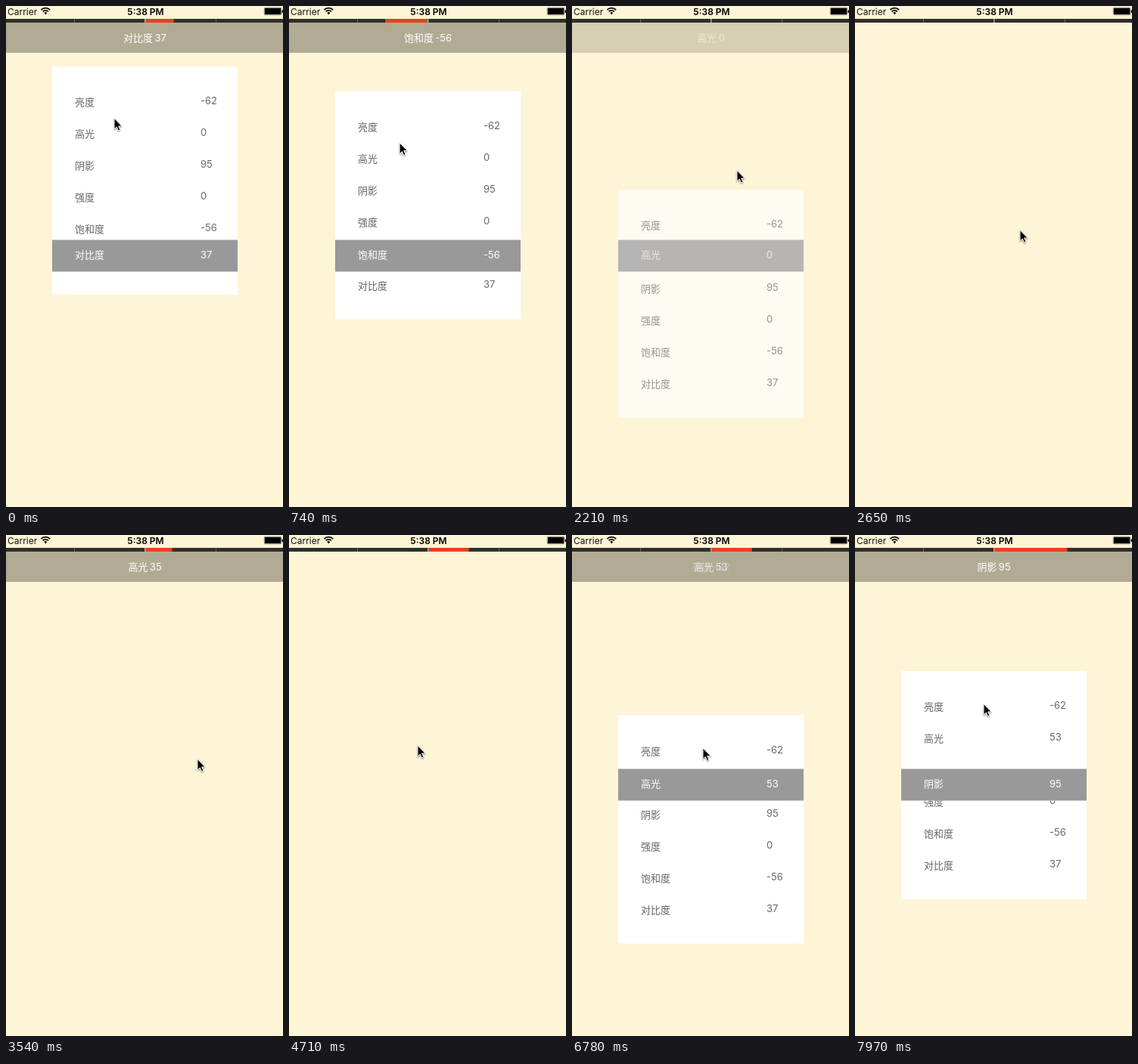
An HTML page with a canvas that plays this animation: 366x663 px, repeating every 8000 ms.

```html
<!DOCTYPE html>
<html lang="zh-CN">
<head>
<meta charset="utf-8">
<style>
  html, body { margin: 0; width: 100%; height: 100%; overflow: hidden; background: #fef4d6; }
  canvas { display: block; }
</style>
</head>
<body>
<canvas id="stage" width="366" height="663"></canvas>
<script>
const g = document.getElementById('stage').getContext('2d');
const FONT = 'Inter, "Noto Sans CJK SC", "Noto Sans CJK", sans-serif';
const LOOP = 8000, STEP = 147.4;
const LEFT = 61, WIDTH = 245, ROW = 42, BAND_Y = 309.5;
const LABELS = ['亮度', '高光', '阴影', '强度', '饱和度', '对比度'];

// Progress from 0 to 1 between steps a and b
const ramp = (k, a, b) => Math.max(0, Math.min(1, (k - a) / (b - a)));
const easeIn = (x, p) => x ** p;
const easeOut = (x, p) => 1 - (1 - x) ** p;
const smooth = x => x * x * (3 - 2 * x);

// Four vertical drags move the panel, one sideways drag sets the highlight
const panelTop = k => Math.round(2 * (80
  + 90 * easeIn(ramp(k, 0, 8), 2.17)
  + 73 * ramp(k, 9, 13)
  + 43 * easeOut(ramp(k, 33, 41), 2.37)
  - 86 * smooth(ramp(k, 43.36, 48.3))
  - 20 * ramp(k, 53, 54))) / 2;

const highlight = k => Math.round(53 * easeOut(ramp(k, 19, 29), 1.56));

const titleAlpha = k =>
  1 - ramp(k, 14, 16) + ramp(k, 19, 21) - ramp(k, 29, 31) + ramp(k, 33, 35);

const panelAlpha = k => 1 - ramp(k, 14, 17.3) + ramp(k, 33, 35);

// The pointer holds the panel and takes a new grip between drags
const pointerX = k => 143 + 5 * ramp(k, 0, 8) + 70 * ramp(k, 8, 13)
  + highlight(k) - 101 * ramp(k, 29, 32)
  + 3 * (ramp(k, 41, 44) - ramp(k, 46, 50));

const pointerY = k => panelTop(k) + 68.5 - 94 * ramp(k, 8, 9)
  + 79 * ramp(k, 15, 18) - 18 * ramp(k, 29, 32) + 8 * ramp(k, 43, 46);

const selectedAt = k =>
  Math.max(0, Math.min(5, Math.round((283.5 - panelTop(k)) / ROW)));

function rect(color, x, y, w, h) {
  g.fillStyle = color;
  g.fillRect(x, y, w, h);
}

function text(str, x, y, color, font = '13px', align = 'left') {
  g.font = font + ' ' + FONT;
  g.textAlign = align;
  g.fillStyle = color;
  g.fillText(str, x, y);
}

function statusBar() {
  text('Carrier', 2, 11.5, '#111', '12px');
  text('5:38 PM', 184.5, 11.5, '#000', '600 12px', 'center');
  g.strokeStyle = '#000';
  g.lineWidth = 1.7;
  const wave = r => {
    g.beginPath();
    g.arc(52.3, 11, r, -Math.PI * .75, -Math.PI * .25);
  };
  wave(8.3);
  g.stroke();
  wave(5.2);
  g.stroke();
  wave(2.8);
  g.lineTo(52.3, 11.5);
  g.fillStyle = '#000';
  g.fill();
  g.lineWidth = .5;
  g.beginPath();
  g.roundRect(341.25, 2.25, 22.5, 9.5, 1.5);
  g.stroke();
  rect('#000', 342, 3, 21, 8);
  rect('#000', 364.5, 5.5, 1.5, 3.5);
}

function slider(value) {
  rect('#2f302b', 0, 17, 366, 5);
  rect('#66665e', 90, 17, 1, 5);
  rect('#66665e', 277, 17, 1, 5);
  rect('#e8421f', 184, 17, value * 1.015, 5);
  rect('#a5a59c', 183, 17, 1.5, 5);
}

function title(k, sel, values) {
  const alpha = titleAlpha(k), old = selectedAt(Math.max(0, k - 1));
  const line = i => text(LABELS[i] + ' ' + values[i], 183.5, 47, '#fff', '13px', 'center');
  g.save();
  g.wordSpacing = '-1.2px';
  g.globalAlpha = alpha;
  rect('#b1ab94', 0, 22, 366, 40);
  if (old === sel) line(sel);
  else {
    g.globalAlpha = alpha * .7;
    line(sel);
    g.globalAlpha = alpha * .3;
    line(old);
  }
  g.restore();
}

function panel(k, sel, values) {
  const top = panelTop(k);
  g.save();
  g.globalAlpha = panelAlpha(k);
  rect('#fff', LEFT, top, WIDTH, 302);
  rect('#999', LEFT, BAND_Y, WIDTH, ROW);
  text(LABELS[sel], 91, 334, '#fff');
  text(values[sel], 257, 334, '#fff');
  // Other rows pass behind the band
  g.beginPath();
  g.rect(LEFT, 0, WIDTH, BAND_Y);
  g.rect(LEFT, BAND_Y + ROW, WIDTH, 400);
  g.clip();
  LABELS.forEach((label, i) => {
    if (i === sel) return;
    const y = top + ROW * i;
    text(label, 91, y + 52, '#666');
    text(values[i], 257, y + 50, '#666');
  });
  g.restore();
}

const ARROW = new Path2D('M0 0V14.6L3.3 11.5L5.5 16.5L7.9 15.4L5.7 10.5H10.2Z');
function pointer(x, y) {
  g.save();
  g.translate(x, y);
  g.shadowColor = 'rgba(0,0,0,.4)';
  g.shadowBlur = 2;
  g.shadowOffsetY = 1;
  g.fillStyle = '#000';
  g.strokeStyle = '#fff';
  g.lineWidth = 1;
  g.fill(ARROW);
  g.stroke(ARROW);
  g.restore();
}

function draw(ms) {
  const k = Math.min(54, Math.floor((ms % LOOP + 15) / STEP));
  const sel = selectedAt(k);
  const values = [-62, highlight(k), 95, 0, -56, 37];
  rect('#fef4d6', 0, 0, 366, 663);
  statusBar();
  slider(values[sel]);
  title(k, sel, values);
  panel(k, sel, values);
  pointer(pointerX(k), pointerY(k));
}

let start;
function tick(now) {
  start ??= now;
  draw(now - start);
  requestAnimationFrame(tick);
}
draw(0);
requestAnimationFrame(tick);
</script>
</body>
</html>
```
